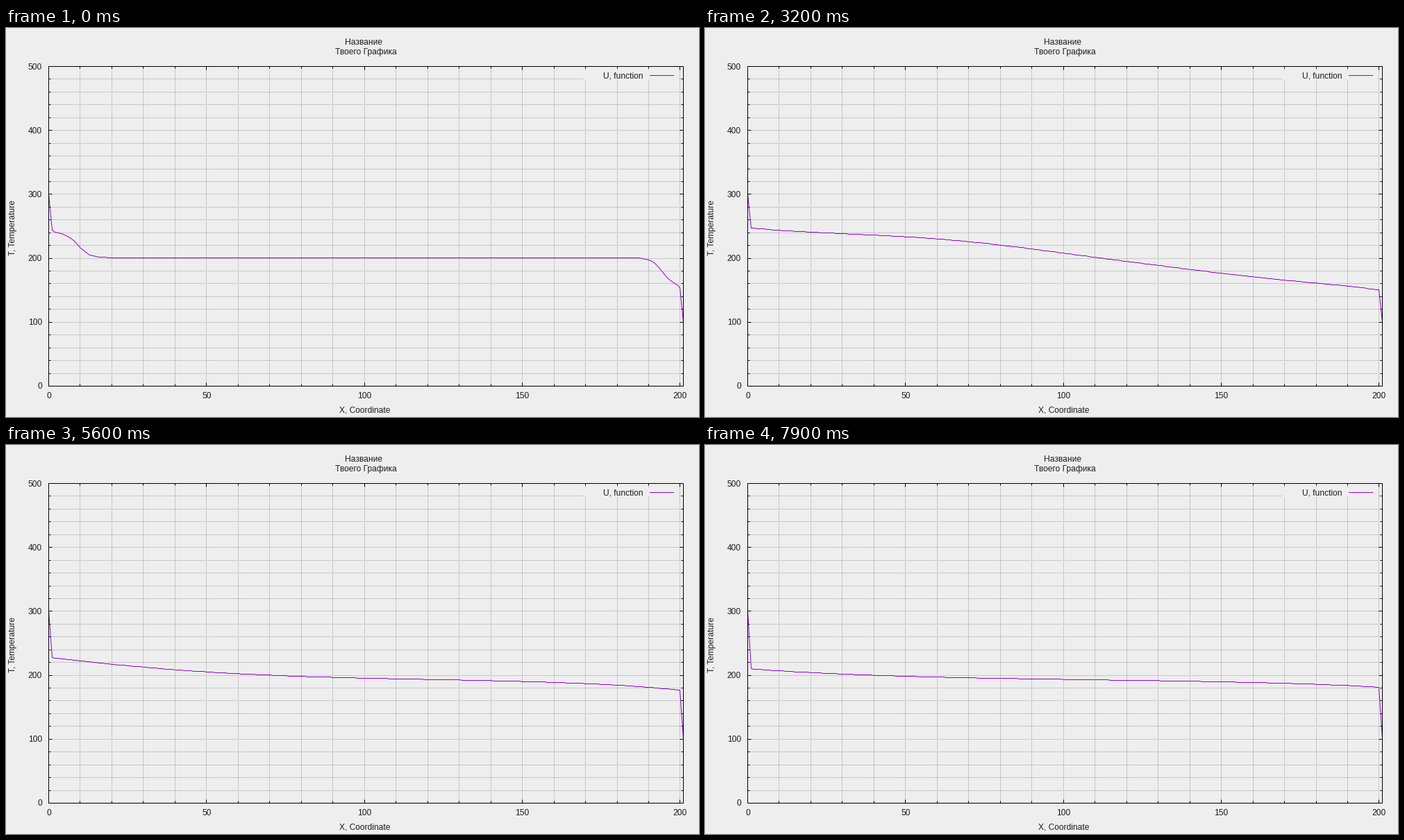
Recreate the animation shown at these times as a matplotlib script. Size 998 by 561 pixels, loop 8000 ms.

```python
import numpy as np
import matplotlib.pyplot as plt
from matplotlib.animation import FuncAnimation
from matplotlib.collections import LineCollection

W, H, DPI = 998, 561, 64
PX = 72 / DPI                        # one pixel in points
L, R, T, B = 61.5, 975.5, 55.5, 516.5     # plot frame
KL, KR, KT, KB = 832, 970, 61, 75         # key box, kept free of grid
FRAMES, STEP = 80, 100
PURPLE, GREY, INK = "#9400d3", "#a0a0a0", "#1c1c1c"

plt.rcParams["font.family"] = "Liberation Sans"
plt.rcParams["font.size"] = 12 * PX

nodes = np.arange(202)


def px(x):
    return L + np.asarray(x) * (R - L) / 201


def py(v):
    return B - np.asarray(v) * (B - T) / 500


def pixel(a):
    return np.floor(a) + 0.5


def temperature(n):
    """Two widening fronts cross the rod from the hot and the cold wall."""
    x = nodes
    width = 3.5 + 1.2 * n - 0.002 * n**2
    hot = 18.7 * (1 - np.tanh((x - 9.5 - 4.3 * n) / width))
    cold = 21.5 * (1 + np.tanh((x - 194.2 + 3.27 * n) / width))
    wall = 10 - 4.5 * np.exp(-n / 2)
    near_hot = wall * np.exp(-(x - 1) / (2 + 0.6 * n))
    near_cold = wall * np.exp(-(200 - x) / (1 + 0.5 * n))
    base = 201 - 1.6 * (1 + np.tanh((n - 48) / 14))
    v = base + hot - cold + near_hot - near_cold
    v[0], v[-1] = 300, 100
    return v


fig = plt.figure(figsize=(W / DPI, H / DPI), dpi=DPI, facecolor="#eeeeee")
ax = fig.add_axes([0, 0, 1, 1])
ax.set(xlim=(0, W), ylim=(H, 0))
ax.axis("off")


def lines(segs, color, z, **kw):
    ax.add_collection(LineCollection(segs, colors=color, linewidths=PX, zorder=z,
                                     snap=False, **kw), autolim=False)


def label(x, y, s, ha="center", **kw):
    ax.text(x, y, s, ha=ha, va="baseline", color=INK, zorder=5, **kw)


grid, ticks = [], []
for v in range(0, 201, 10):
    x, size = pixel(px(v)), 5 if v % 50 == 0 else 3
    ticks += [[(x, B), (x, B - size)], [(x, T), (x, T + size)]]
    if v:
        spans = [(T + 0.5, KT), (KB, B)] if KL < x < KR else [(T + 0.5, B)]
        grid += [[(x, a), (x, b)] for a, b in spans]
for v in range(0, 501, 20):
    y, size = pixel(py(v)), 5 if v % 100 == 0 else 3
    ticks += [[(L, y), (L + size, y)], [(R, y), (R - size, y)]]
    if 0 < v < 500:
        spans = [(L + 0.5, KL), (KR, R)] if KT < y < KB else [(L + 0.5, R)]
        grid += [[(a, y), (b, y)] for a, b in spans]

lines(grid, GREY, 1, linestyles=[(0, (1, 1))])
lines(ticks, "black", 3)
lines([[(L, T), (R, T), (R, B), (L, B), (L, T)]], "black", 3)
lines([[(927, 68.5), (962, 68.5)]], PURPLE, 2)

for v in range(0, 201, 50):
    label(px(v), 534.5, str(v))
for v in range(0, 501, 100):
    label(52, py(v) + 4, str(v), "right")
label(515.3, 24, "Название")
label(518, 38, "Твоего Графика")
label(516.3, 554.5, "X, Coordinate")
label(13.5, 287.5, "T, Temperature", rotation=90, rotation_mode="anchor")
label(917.5, 72, "U, function", "right")

curve, = ax.plot([], [], color=PURPLE, lw=PX, snap=False, zorder=2)
curve_x = pixel(px(nodes))


def draw(n):
    curve.set_data(curve_x, pixel(py(temperature(n))))
    return curve,


anim = FuncAnimation(fig, draw, frames=FRAMES, interval=STEP, repeat=True,
                     repeat_delay=0)
plt.show()
```
